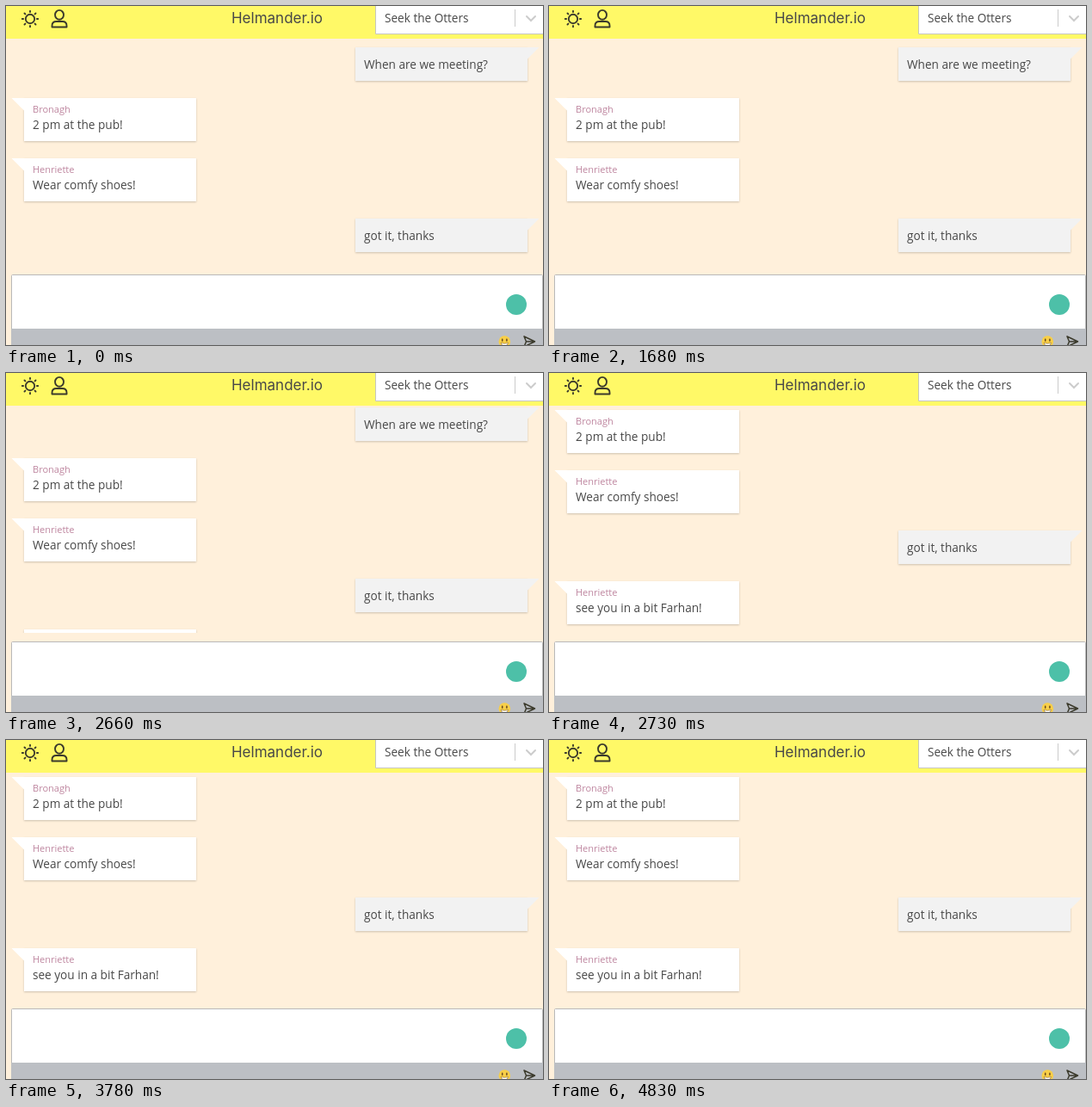
Recreate the animation shown at these times as an HTML page. Size 624 px wide and 394 px high, loop 4.97 s.

```html
<!DOCTYPE html>
<html lang="en">
<head>
<meta charset="utf-8">
<title>Group chat</title>
<style>
  html, body { margin: 0; width: 100%; height: 100%; overflow: hidden; background: #fff0db; }
  svg { display: block; width: 624px; height: 394px; }
  text { font: 13.6px "Open Sans", sans-serif; fill: #484848; }
  .title { font: 17px Inter, sans-serif; text-anchor: middle; }
  .name { font-size: 11px; fill: #bf87a0; }
  .box { filter: drop-shadow(0 1px 1px #0003); }
  .icon { fill: none; stroke: #3b3a2c; stroke-width: 1.9; stroke-linecap: round; stroke-linejoin: round; }
</style>
</head>
<body>
<svg viewBox="0 0 624 394">
  <defs><clipPath id="log"><rect y="38" width="624" height="264"/></clipPath></defs>
  <rect width="624" height="394" fill="#fff0db"/>

  <g clip-path="url(#log)"><g id="messages"></g></g>

  <!-- header -->
  <rect width="624" height="38" fill="#fff967"/>
  <g class="icon">
    <circle cx="28" cy="15" r="5.2"/>
    <g id="rays"></g>
    <ellipse cx="62" cy="10.3" rx="5" ry="5.4"/>
    <path d="M53.5 24.5v-1.5q0-5 5-5h7q5 0 5 5v1.5z"/>
  </g>
  <text class="title" x="315" y="20">Helmander.io</text>
  <path d="M429.5-1V32.5H625V-1z" fill="#fff" stroke="#c6c6c0"/>
  <text x="440" y="19">Seek the Otters</text>
  <path d="M591.5 4V24" stroke="#ccc"/>
  <path d="M605 12l5 5 5-5" fill="none" stroke="#ccc" stroke-width="2" stroke-linecap="round"/>

  <!-- composer -->
  <rect x="6.5" y="312.5" width="617" height="84" rx="1" fill="#fff" stroke="#b9b9b9"/>
  <rect x="6" y="375" width="618" height="19" fill="#bcbfc4"/>
  <circle cx="593" cy="347" r="12" fill="#4dc0a8"/>
  <circle cx="579.3" cy="390" r="6.8" fill="#f8cf48"/>
  <path d="M576.7 387.3v2M581.9 387.3v2" stroke="#6b4a20" stroke-width="1.5" stroke-linecap="round"/>
  <path d="M575 391.5q4.3 1.5 8.6 0-.8 3.5-4.3 3.5t-4.3-3.5" fill="#fff" stroke="#8a6528" stroke-width=".6"/>
  <path class="icon" style="stroke-width:1.5" d="M602 384l12.5 6-12.5 6 2.5-6zM604.5 390h10"/>
</svg>
<script>
const LOOP = 4970, REVEAL = 2660, SETTLE = 2730;
const messages = document.getElementById("messages");

const received = (y, name, text, id = "") => `
  <rect class="box" x="21" y="${y}" width="200" height="50" fill="#fff"/>
  <path id="${id}" d="M6.5 ${y}h15v15z" fill="#fff"/>
  <text class="name" x="31" y="${y + 17}">${name}</text>
  <text x="31" y="${y + 36}">${text}</text>`;

const sent = (y, text) => `
  <rect class="box" x="406" y="${y}" width="200" height="39" fill="#f2f2f2"/>
  <path d="M605.5 ${y}h14l-14 14z" fill="#f2f2f2"/>
  <text x="416" y="${y + 25}">${text}</text>`;

messages.innerHTML =
  sent(48, "When are we meeting?") +
  received(107, "Bronagh", "2 pm at the pub!") +
  received(177, "Henriette", "Wear comfy shoes!") +
  sent(247, "got it, thanks") +
  received(306, "Henriette", "see you in a bit Farhan!", "newTip");

document.getElementById("rays").innerHTML = Array.from({ length: 8 }, (_, i) =>
  `<path d="M28 7.1V5.8" transform="rotate(${i * 45} 28 15)"/>`).join("");

const newTip = document.getElementById("newTip");

function draw(now) {
  const t = now % LOOP;
  const scroll = t < REVEAL ? 0 : t < SETTLE ? 8 : 64;
  messages.setAttribute("transform", `translate(0 ${-scroll})`);
  newTip.setAttribute("visibility", t < SETTLE ? "hidden" : "visible");
  requestAnimationFrame(() => draw(performance.now()));
}
draw(performance.now());
</script>
</body>
</html>
```
